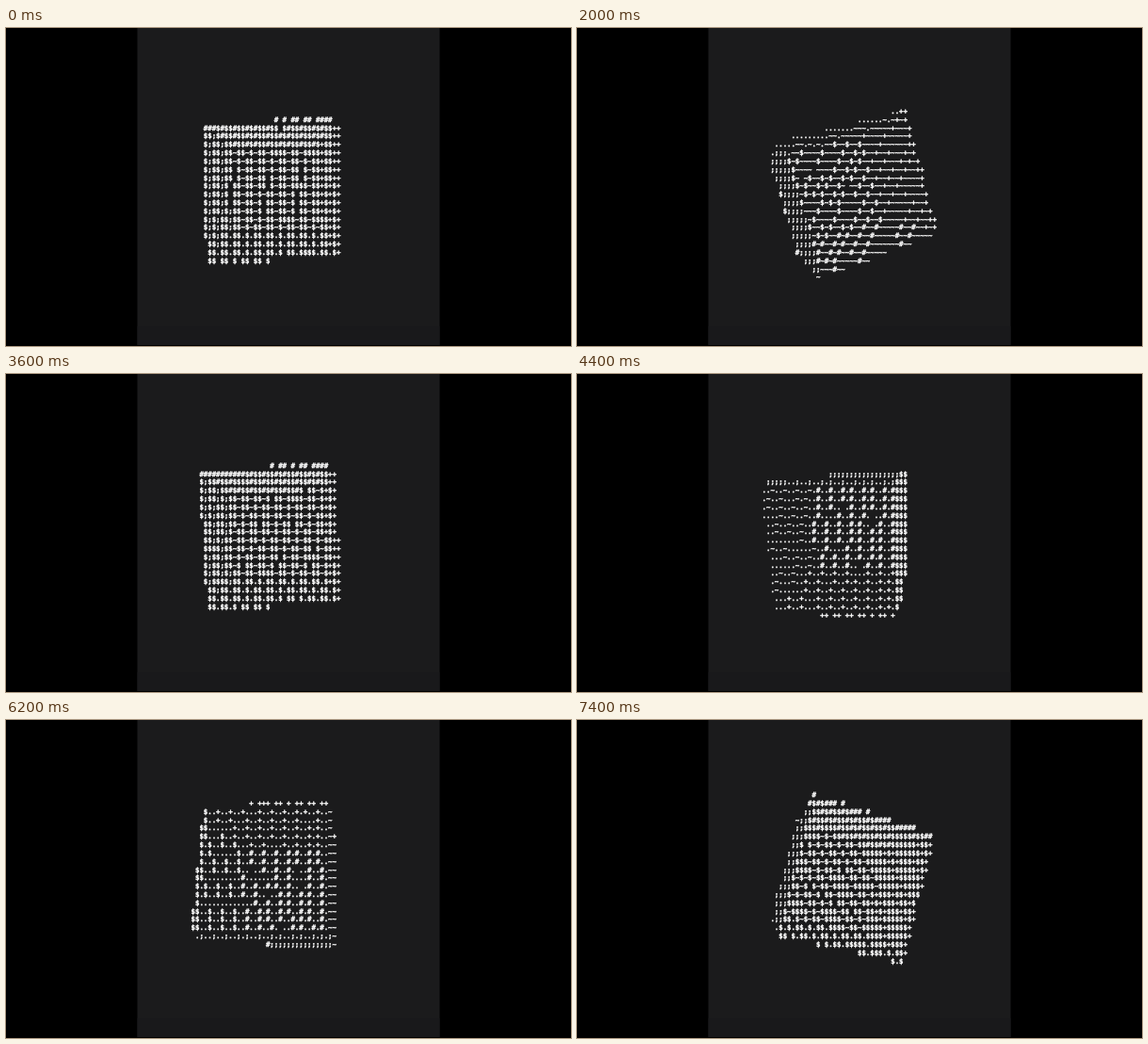
Write an HTML page with a canvas that moves like this. It is 600 by 338 pixels and loops after 7500 ms.

```html
<!DOCTYPE html>
<html lang="en">
<head>
<meta charset="utf-8">
<title>Spinning ASCII cube</title>
<style>
  html, body { margin: 0; width: 100%; height: 100%; overflow: hidden; background: #000; }
  canvas { display: block; }
</style>
</head>
<body>
<canvas id="stage" width="600" height="338"></canvas>
<script>
const ctx = document.getElementById('stage').getContext('2d');

const STEP = 100, FRAMES = 75;
const COLS = 160, ROWS = 44;
const HALF = 10, CAMERA = 60, FOCAL = 40;

// The cube turns in whole steps of 0.05 rad, about 3.5 of them per picture.
const angleAt = frame => 0.05 * Math.round(93.8 + 3.48 * frame) - 0.012;

// The terminal font grows by one step for a short while.
const NORMAL = { w: 4.41, h: 8.82, x: -68, y: -22, size: 7.4 };
const LARGE = { w: 4.9, h: 9.31, x: -68, y: -21, size: 8 };
const gridAt = frame => frame >= 26 && frame < 36 ? LARGE : NORMAL;

function renderCube(angle) {
  const s = Math.sin(angle), c = Math.cos(angle);
  const chars = new Array(COLS * ROWS).fill('');
  const depth = new Float64Array(COLS * ROWS);

  function plot(i, j, k, ch) {
    const x = j * s * s - k * c * s + i * c;
    const y = j * c + k * s;
    const near = 1 / (CAMERA + k * c * c - j * s * c + i * s);
    const col = Math.trunc(COLS / 2 + 2 * FOCAL * near * x);
    const row = Math.trunc(ROWS / 2 + FOCAL * near * y);
    const cell = row * COLS + col;
    if (near > depth[cell]) {
      depth[cell] = near;
      chars[cell] = ch;
    }
  }

  // Samples are sparse, so the far faces show through the gaps.
  for (let u = -HALF; u < HALF; u++) {
    for (let v = -HALF; v < HALF; v++) {
      plot(u, v, -HALF, '.');
      plot(HALF, v, u, '$');
      plot(-HALF, v, -u, '~');
      plot(-u, v, HALF, '#');
      plot(u, -HALF, -v, ';');
      plot(u, HALF, v, '+');
    }
  }
  return chars;
}

function drawPanel() {
  ctx.fillStyle = '#000';
  ctx.fillRect(0, 0, 600, 338);
  ctx.fillStyle = '#1b1b1c';
  ctx.fillRect(139.5, 0, 321, 337);
  ctx.fillStyle = '#19191b';
  ctx.fillRect(139.5, 317, 321, 20);
}

function draw(frame) {
  const grid = gridAt(frame);
  drawPanel();
  ctx.fillStyle = ctx.strokeStyle = '#fff';
  ctx.lineWidth = 0.4;
  ctx.lineJoin = 'round';
  ctx.font = `bold ${grid.size}px "DejaVu Sans Mono", monospace`;
  ctx.textAlign = 'center';
  renderCube(angleAt(frame)).forEach((ch, cell) => {
    if (!ch) return;
    const col = cell % COLS, row = Math.floor(cell / COLS);
    const x = grid.x + (col + 0.5) * grid.w;
    const y = grid.y + (row + 0.5) * grid.h + 2.7;
    ctx.fillText(ch, x, y);
    ctx.strokeText(ch, x, y);
  });
}

let shown = -1;
const begin = performance.now();
function tick() {
  const frame = Math.floor((performance.now() - begin) / STEP) % FRAMES;
  if (frame !== shown) draw(shown = frame);
  requestAnimationFrame(tick);
}
tick();
</script>
</body>
</html>
```
